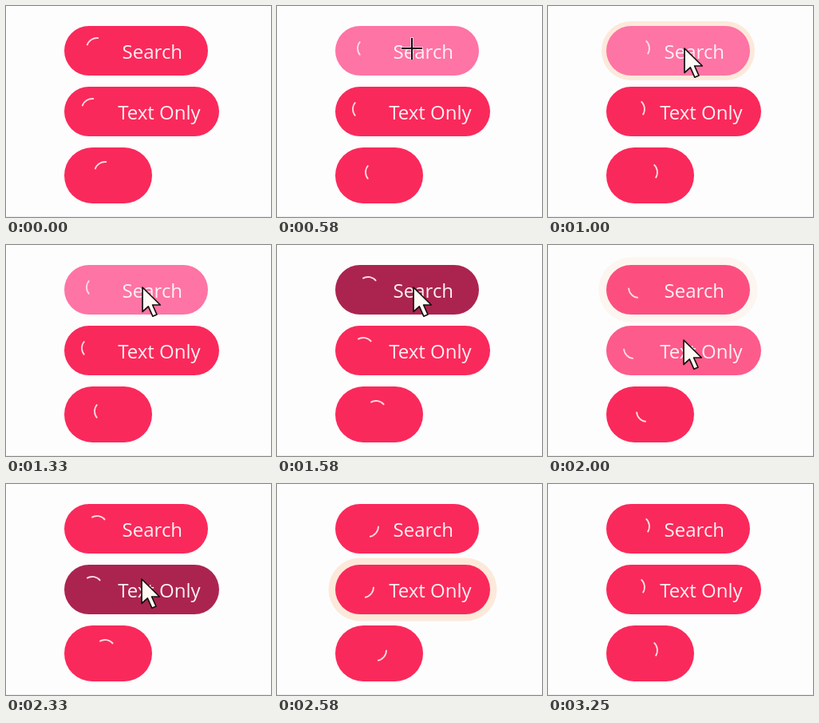
These frames come from a looping animation (332x264 px, 3330 ms). An HTML page:

```html
<!DOCTYPE html>
<html lang="en">
<head>
<meta charset="utf-8">
<title>Loading buttons</title>
<style>
  html, body { margin: 0; width: 100%; height: 100%; overflow: hidden; background: #fdfdfe; }
  svg { display: block; width: 332px; height: 264px; }
  text { font: 24px "Open Sans", "Noto Sans", sans-serif; fill: #fff1f3; }
  .arc { fill: none; stroke: #ffdce1; stroke-width: 1.8; }
  .ring { fill: #fde9da; }
</style>
</head>
<body>
<svg id="stage" viewBox="0 0 332 264">
  <rect y="263" width="332" height="1" fill="#f0f0f2"/>
  <g id="buttons"></g>
  <g id="arrow">
    <path d="M0 0V30.5L7.3 23.8L12.8 36.2L18 34L12.6 22H22.3Z"
          fill="#fffaf4" stroke="#15100f" stroke-width="1.7" stroke-linejoin="round"/>
  </g>
  <g id="cross" fill="none">
    <path d="M-14 0H14M0 -14V14" stroke="#fff" stroke-width="4" opacity=".6"/>
    <path d="M-13 0H13M0 -13V14" stroke="#111" stroke-width="2"/>
  </g>
</svg>
<script>
const LOOP = 3330, STEPS = 40, TICK = LOOP / STEPS;
const RED = [250, 41, 91], PINK = [254, 116, 165], DARK = [171, 36, 80];

// One turn of the spinner, degrees clockwise from the top
const TURN = [-32, 10, 46, 83, 130, 178, 226, 270, 298];

// Ring after a release: [spread, opacity] per step
const RING = [[3, 1], [6, 1], [8.5, 1], [9, .75], [9.5, .4]];

// fill: [step, colour], blended between entries; rings: steps at which one starts
const BUTTONS = [
  { x: 73, y: 25, w: 180, h: 62, spin: [114, 53], label: "Search", tx: 145.6, ty: 66,
    fill: [[4, RED], [7, PINK], [8, PINK], [9, DARK], [10, DARK], [12, PINK], [17, PINK],
           [18, DARK], [19, DARK], [20, PINK], [22, PINK], [26, RED]],
    rings: [11, 20] },
  { x: 73, y: 101, w: 194, h: 62, spin: [108, 129], label: "Text Only", tx: 140.2, ty: 142,
    fill: [[22, RED], [25, PINK], [26, PINK], [27, DARK], [28, DARK], [30, RED]],
    rings: [29] },
  { x: 73, y: 177, w: 110, h: 70, spin: [124, 208], fill: [[0, RED]], rings: [] }
];

// Pointer: [step, x, y]
const PATH = [[3, 287, 120], [4, 238, 84], [5, 195, 62], [6, 174, 54], [7, 169, 53], [9, 169, 53],
              [10, 171, 53], [20, 171, 53], [21, 173, 78], [22, 175, 101], [23, 173, 112],
              [24, 170, 119], [28, 170, 119], [29, 169, 150], [30, 168, 202]];
const CROSS_FROM = 7, CROSS_TO = 9;

const root = document.getElementById("buttons");
const arrow = document.getElementById("arrow");
const cross = document.getElementById("cross");

function add(tag, attrs, parent) {
  const el = document.createElementNS("http://www.w3.org/2000/svg", tag);
  set(el, attrs);
  return parent.appendChild(el);
}

function set(el, attrs) {
  for (const key in attrs) el.setAttribute(key, attrs[key]);
}

function pill(b, grow = 0) {
  return { x: b.x - grow, y: b.y - grow, width: b.w + 2 * grow, height: b.h + 2 * grow, rx: b.h / 2 + grow };
}

function arcPath(r, span) {
  const a = span * Math.PI / 360, x = r * Math.sin(a), y = -r * Math.cos(a);
  return `M${-x} ${y}A${r} ${r} 0 0 1 ${x} ${y}`;
}

function blend(a, b, k) {
  return a.map((v, i) => v + (b[i] - v) * k);
}

// Linear lookup in a list of [step, value], held at both ends
function at(keys, n) {
  if (n <= keys[0][0]) return keys[0][1];
  for (let i = 1; i < keys.length; i++) {
    const [s0, v0] = keys[i - 1], [s1, v1] = keys[i];
    if (n <= s1) return blend(v0, v1, (n - s0) / (s1 - s0));
  }
  return keys[keys.length - 1][1];
}

for (const b of BUTTONS) {
  b.ring = add("rect", { class: "ring" }, root);
}
for (const b of BUTTONS) {
  b.body = add("rect", pill(b), root);
  b.arc = add("path", { class: "arc", d: arcPath(13, 82) }, root);
  if (b.label) add("text", { x: b.tx, y: b.ty }, root).textContent = b.label;
}

const route = PATH.map(([s, x, y]) => [s, [x, y]]);

function draw(n) {
  for (const b of BUTTONS) {
    const start = b.rings.find(s => n >= s && n < s + RING.length);
    const [grow, alpha] = start === undefined ? [0, 0] : RING[n - start];
    set(b.ring, { ...pill(b, grow), opacity: alpha });
    set(b.body, { fill: `rgb(${at(b.fill, n).map(Math.round)})` });
    set(b.arc, { transform: `translate(${b.spin}) rotate(${TURN[n % TURN.length]})` });
  }
  const seen = n >= PATH[0][0] && n <= PATH[PATH.length - 1][0];
  const crossed = n >= CROSS_FROM && n <= CROSS_TO;
  const move = `translate(${at(route, n)})`;
  set(arrow, { transform: move, visibility: seen && !crossed ? "visible" : "hidden" });
  set(cross, { transform: move, visibility: crossed ? "visible" : "hidden" });
}

const began = performance.now();
function tick() {
  const t = (performance.now() - began) % LOOP;
  // steps begin on whole hundredths, slightly ahead of the even grid
  draw(Math.min(STEPS - 1, Math.floor((t + 5) / TICK)));
  requestAnimationFrame(tick);
}
tick();
</script>
</body>
</html>
```
